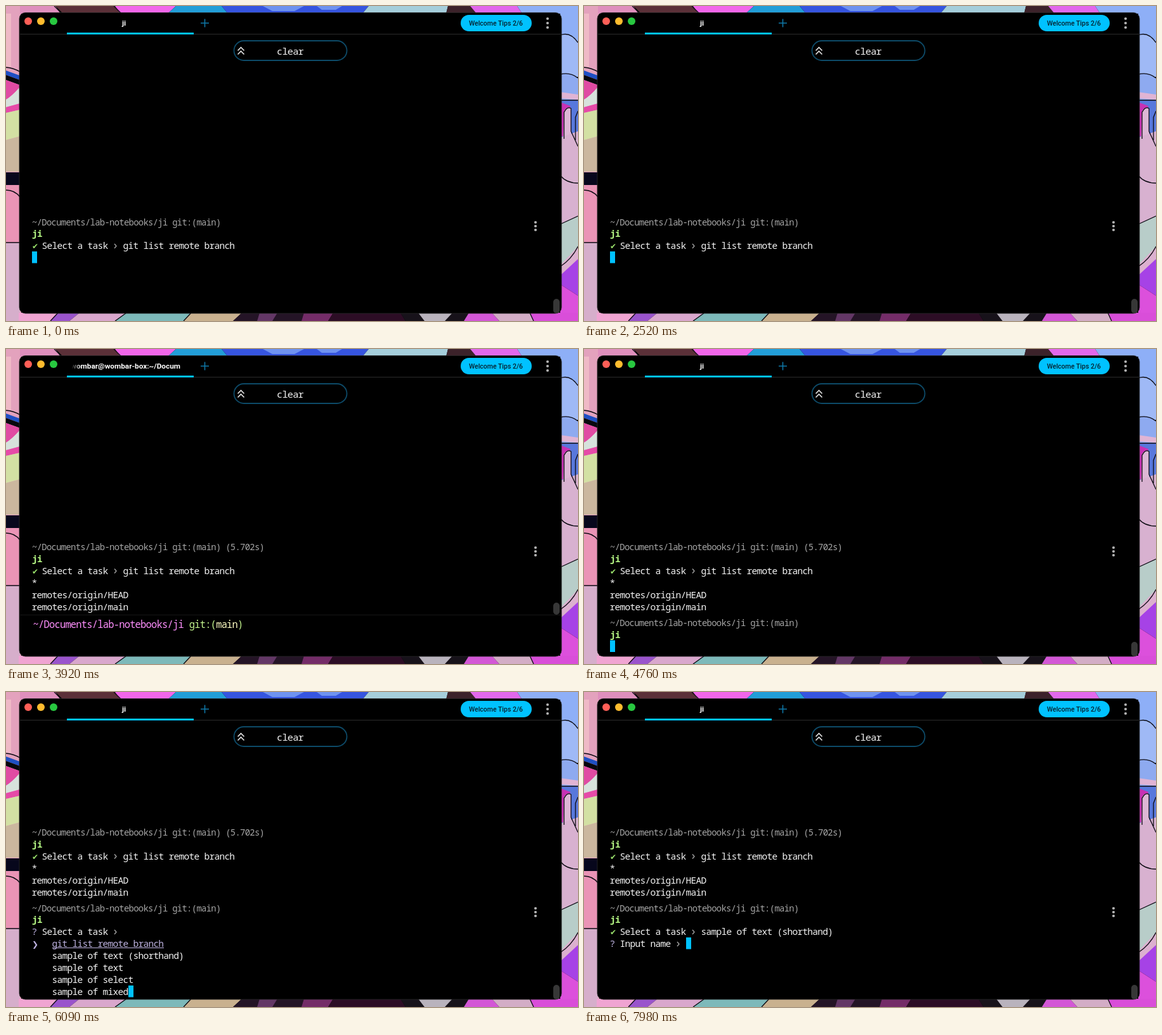
An HTML page that plays this animation: 902 by 498 pixels, repeating every 8000 ms.

```html
<!DOCTYPE html>
<html lang="en">
<head>
<meta charset="utf-8">
<title>Terminal task picker</title>
<style>
html, body { margin: 0; width: 100%; height: 100%; overflow: hidden; background: #000; }
svg { display: block; width: 100vw; height: 100vh; }
text { white-space: pre; }
.mono { font-family: "Noto Sans Mono", "DejaVu Sans Mono", monospace; font-weight: 500; }
.ui { font-family: Roboto, Inter, sans-serif; }
</style>
</head>
<body>
<svg id="stage" viewBox="0 0 902 498" preserveAspectRatio="none">
  <defs>
    <linearGradient id="fade">
      <stop offset="0.35" stop-color="#000"/>
      <stop offset="1" stop-color="#000" stop-opacity="0"/>
    </linearGradient>
    <clipPath id="tab"><rect x="96" y="10" width="200" height="34"/></clipPath>
  </defs>
  <g id="wall"></g>
  <rect x="21" y="10.5" width="855" height="475.5" rx="9.5" stroke="#2a2a2a" stroke-width=".8"/>
  <circle cx="35" cy="24" r="6" fill="#ff5f57"/>
  <circle cx="55" cy="24" r="6" fill="#febc2e"/>
  <circle cx="75" cy="24" r="6" fill="#28c840"/>
  <path d="M22 44.5H875" stroke="#2c2c2c"/>
  <rect x="96" y="42" width="200" height="3" fill="#00c2ff"/>
  <path d="M307 27H320M313.5 20.5V33.5" stroke="#0f78a8" stroke-width="1.6"/>
  <rect x="717" y="14" width="112" height="26" rx="13" fill="#00c2ff"/>
  <text class="ui" x="772.5" y="30.7" font-size="10.5" font-weight="500" text-anchor="middle" fill="#06202c">Welcome Tips 2/6</text>
  <g fill="#b4b4b4"><circle cx="854" cy="20" r="2.1"/><circle cx="854" cy="27" r="2.1"/><circle cx="854" cy="34" r="2.1"/></g>
  <rect x="359.5" y="55" width="178" height="31" rx="15.5" fill="#000" stroke="#0d4a68" stroke-width="1.8"/>
  <path d="M365.5 70.5L370.5 65.5L375.5 70.5M365.5 76.5L370.5 71.5L375.5 76.5" fill="none" stroke="#e4e4e4" stroke-width="1.6"/>
  <g id="label" class="mono"></g>
  <g id="title" class="ui" font-size="11.8" font-weight="700" fill="#fff" clip-path="url(#tab)"></g>
  <g id="term" class="mono"></g>
</svg>
<script>
const $ = id => document.getElementById(id);
const LOOP = 8000, LEFT = 41, ROW = 19;
// Character advances: output, block header, input line
const CELL = 8, SMALL = 7.63, BIG = 8.49;
const WHITE = '#f4f4f4', GREY = '#a6a6a6', GREEN = '#b4f583', LILAC = '#bdb2e0';
const CMD = 'ji', PATH = '~/Documents/lab-notebooks/' + CMD;
const TASKS = ['git list remote branch', 'sample of text (shorthand)', 'sample of text', 'sample of select', 'sample of mixed'];

// Wallpaper visible around the window: [fill, path]
const wall = [
  ['#e3a2bd', 'M0 0H24V498H0Z'],
  ['#efb9c6', 'M0 12H8V96H0Z'],
  ['#df8fbd', 'M22 0H78L86 12H22Z'],
  ['#5b3038', 'M78 0H172L180 12H90Z'],
  ['#f266ea', 'M172 0H268L255 12H180Z'],
  ['#229ed8', 'M268 0H340L350 12H255Z'],
  ['#3655e0', 'M340 0H572L562 12H350Z'],
  ['#6f93f0', 'M405 0H470L455 8H420ZM490 0H530L520 6H498Z'],
  ['#a5cedb', 'M572 0H697L694 12H562Z'],
  ['#3c222a', 'M697 0H732L742 12H694Z'],
  ['#e268ec', 'M732 0H806L814 12H742Z'],
  ['#8eaff7', 'M806 0H902V60H874V12H814Z'],
  ['#1f50c4', 'M0 102L22 110V117L0 109Z'],
  ['#08080e', 'M0 109L22 117V125L0 117Z'],
  ['#e04ba3', 'M0 117L22 125V128Q10 142 0 148Z'],
  ['#d7e2dc', 'M0 148Q10 142 22 128V154L0 160Z'],
  ['#e64aa8', 'M0 160L22 154V164L0 169Z'],
  ['#d3e0a3', 'M0 169L22 164V206L0 212Z'],
  ['#cbb79e', 'M0 212L22 206V262H0Z'],
  ['#07071c', 'M0 263H22V283H0Z'],
  ['#ea94b6', 'M0 283H22V374H0Z'],
  ['#d6aecb', 'M0 374H22V498H0Z'],
  ['#9fb9f6', 'M874 46Q890 40 902 58V112H874Z'],
  ['#8eaaf0', 'M874 108Q890 104 902 114V150H874Z'],
  ['#e0b4d4', 'M874 136L902 140V148L874 146Z'],
  ['#5878dc', 'M874 149H902V212H874Z'],
  ['#c832b4', 'M874 152L890 158L879 206H874Z'],
  ['#ddb7d5', 'M880 166Q885 158 891 162V222H878Z'],
  ['#d8b1d0', 'M874 208L902 198V345H874Z'],
  ['#b8cdc9', 'M874 345L902 332V382L874 412Z'],
  ['#dcb0cf', 'M874 410L902 380V402L874 428Z'],
  ['#a642e6', 'M874 426L902 400V458L874 440Z'],
  ['#dc50dc', 'M874 440L902 458V498H874Z'],
  ['#f0a4d2', 'M20 485H82L70 498H20Z'],
  ['#9a54cc', 'M82 485H116L100 498H70Z'],
  ['#d9a7cd', 'M116 485H190L172 498H100Z'],
  ['#7db9ba', 'M190 485H292L280 498H172Z'],
  ['#c9b18f', 'M292 485H372L358 498H280Z'],
  ['#241426', 'M372 485H470V498H358Z'],
  ['#633766', 'M400 485H428L420 498H396Z'],
  ['#742c68', 'M470 485H516L508 498H466Z'],
  ['#2c0d25', 'M516 485H622L630 498H508Z'],
  ['#17121a', 'M622 485H730L722 498H630Z'],
  ['#b9b3bd', 'M650 485H704L692 498H660Z'],
  ['#d357d6', 'M730 485H766L778 498H722Z'],
  ['#d3adc6', 'M766 485H826L832 498H778Z'],
  ['#d94ed9', 'M826 485H902V498H832Z']
];
const outlines = 'M0 97Q12 98 22 104M0 291Q14 291 22 302M0 374H22M76 0L88 12M170 0L182 12M874 46Q890 40 902 58' +
  'M874 108Q890 104 902 114M874 149H902M880 210V168Q885 158 891 162V198L902 222M898 212V176L902 166' +
  'M874 268Q884 280 902 280M874 345L902 332M874 412Q892 400 902 380M82 485L70 498M190 485L172 498M292 485L280 498M826 485L832 498';
$('wall').innerHTML = wall.map(([fill, d]) => `<path d="${d}" fill="${fill}"/>`).join('') +
  `<path d="${outlines}" fill="none" stroke="#0b0a12" stroke-width="1.3"/>`;

// Tall, tightly tracked monospace: the glyphs are 9% larger than their cell suggests
function text(x, y, str, fill, cell = CELL, extra = '') {
  const size = cell / 0.6 * 1.09;
  return `<text x="${x}" y="${y}" fill="${fill}" font-size="${size}" letter-spacing="${cell - size * 0.6}" ${extra}>${str}</text>`;
}
const put = (col, y, str, fill = WHITE) => text(LEFT - 0.4 + col * CELL, y, str, fill);
const cursor = (col, y) => `<rect x="${LEFT + col * CELL}" y="${y - 15}" width="8" height="18.5" fill="#00c2ff"/>`;
const symbol = (y, str, fill) =>
  `<text x="${LEFT}" y="${y}" fill="${fill}" font-size="12" font-family="DejaVu Sans, sans-serif">${str}</text>`;
const arrow = (col, y) =>
  `<path d="M${LEFT + col * CELL + 2} ${y - 8}l3 3.5l-3 3.5" fill="none" stroke="#a8a8a8" stroke-width="1.3"/>`;
const thumb = (y, h) => `<rect x="863" y="${y}" width="10" height="${h}" rx="5" fill="#373737"/>`;
const dots = y => [-6, 0, 6].map(d => `<circle cx="835" cy="${y + d}" r="2.1" fill="#b4b4b4"/>`).join('');

const header = (y, took = '') =>
  text(LEFT, y, `${PATH} git:(main)${took}`, GREY, SMALL, 'font-weight="400"') +
  text(LEFT, y + 18.5, CMD, GREEN, CELL, 'font-weight="700"');
const question = (y, label) => put(0, y, '?', LILAC) + put(2, y, label) + arrow(label.length + 3, y);
const picked = (y, task) =>
  symbol(y, '✔', '#9be36c') + put(2, y, 'Select a task') + arrow(16, y) + put(18, y, task);
const output = y => ['*', 'remotes/origin/HEAD', 'remotes/origin/main'].map((s, i) => put(0, y + i * ROW, s)).join('');
const finished = y => header(y, ' (5.702s)') + picked(y + 37.5, TASKS[0]) + output(y + 56.5);

function input(typed) {
  const part = (col, str, fill, y = 440.5) => text(42.5 + col * BIG, y, str, fill, BIG);
  return '<path d="M22 420.5H875" stroke="#161616"/>' +
    part(0, PATH, '#ff8ffd') + part(29, 'git:(', '#c5f78e') + part(34, 'main', '#fefdc2') + part(38, ')', '#c5f78e') +
    part(0, typed, WHITE, 464);
}

function menu(selected) {
  return TASKS.map((task, i) => {
    const y = 403 + i * ROW, on = i === selected;
    const line = `<path d="M73 ${y + 1.5}h${task.length * CELL}" stroke="${LILAC}"/>`;
    return (on ? symbol(y, '❯', LILAC) + line : '') + put(4, y, task, on ? LILAC : WHITE);
  }).join('') + cursor(19, 479);
}

const prompt = typed => finished(318) + dots(320) + thumb(401, 19) + input(typed);
const second = body => finished(227) + header(346.5) + dots(348) + thumb(463, 23) + body;
const first = body => header(346.5) + picked(384, TASKS[0]) + dots(348) + thumb(463, 23) + body;

// [start ms, tab shows the shell, terminal content]
const scenes = [
  [0, false, () => first(cursor(0, 403))],
  [3150, true, () => first(output(403) + cursor(0, 460))],
  [3290, true, () => prompt('')],
  [4410, true, () => prompt(CMD[0])],
  [4550, true, () => prompt(CMD)],
  [4760, false, () => finished(318) + header(438) + dots(320) + thumb(463, 23) + cursor(0, 475.5)],
  [5530, false, () => second(question(384, 'Select a task') + menu(0))],
  [6650, false, () => second(question(384, 'Select a task') + menu(1))],
  [7210, false, () => second(picked(384, TASKS[1]) + question(403, 'Input name') + cursor(15, 403))]
];

let shown = null;
function render(ms) {
  const scene = scenes.findLast(s => s[0] <= ms);
  if (scene === shown) return;
  shown = scene;
  const [, shell, draw] = scene;
  $('title').innerHTML = shell
    ? '<text x="275" y="31" text-anchor="end">wombar@wombar-box:~/Docum</text><rect x="96" y="16" width="22" height="22" fill="url(#fade)"/>'
    : `<text x="186" y="31" text-anchor="middle">${CMD}</text>`;
  $('term').innerHTML = draw();
}
$('label').innerHTML = text(427, 76.5, 'clear', WHITE, 8.4);

const start = performance.now();
function tick() {
  render(Math.max(0, performance.now() - start) % LOOP);
  requestAnimationFrame(tick);
}
tick();
</script>
</body>
</html>
```
